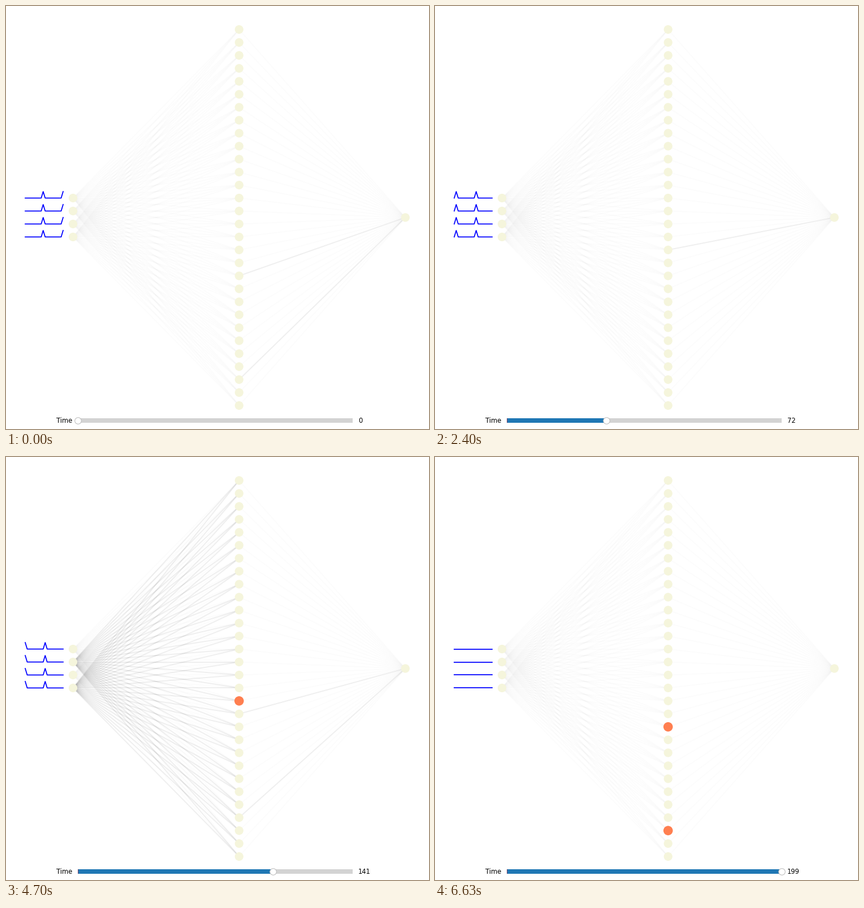
Animation, 748 px wide and 748 px high, one loop 6660 ms. Source, as a matplotlib script:

```python
import numpy as np
import matplotlib.pyplot as plt
from matplotlib.animation import FuncAnimation
from matplotlib.collections import LineCollection
from matplotlib.patches import Circle, Rectangle

SIZE, DPI = 748, 88
PX = 72 / DPI                      # one pixel in points
STEPS, PERIOD, WINDOW = 200, 10, 20
GAP, MID = 22.93, 374
REST, FIRE = "beige", "coral"

fig = plt.figure(figsize=(SIZE / DPI, SIZE / DPI), dpi=DPI, facecolor="white")
ax = fig.add_axes([0, 0, 1, 1])
ax.set(xlim=(0, SIZE), ylim=(SIZE, 0))
ax.axis("off")


def layer(x, n):
    return [(x, MID + GAP * (k - (n - 1) / 2)) for k in range(n)]


inputs, hidden, output = layer(118.5, 4), layer(412.2, 30), layer(706.2, 1)


def fan(starts, ends, alpha, **kw):
    lines = [(a, b) for a in starts for b in ends]
    return ax.add_collection(LineCollection(
        lines, colors="black", alpha=alpha, linewidths=2 * PX, **kw))


# Faint synapses, with a stronger overlay for each sending neuron
fan(inputs, hidden, 0.01, zorder=1)
fan(hidden, output, 0.01, zorder=1)
synapses = {("in", i): fan([p], hidden, 0.05, zorder=2, visible=False)
            for i, p in enumerate(inputs)}
synapses |= {("hid", k): fan([p], output, 0.05, zorder=2, visible=False)
             for k, p in enumerate(hidden)}

neurons = {}
for name, pts in (("in", inputs), ("hid", hidden), ("out", output)):
    for k, p in enumerate(pts):
        neurons[name, k] = ax.add_patch(Circle(p, 7.6, fc=REST, lw=0, zorder=3))

# Incoming spike trains
trace_x = np.linspace(34, 101, WINDOW)
traces = [ax.plot([], [], color="blue", lw=1.75 * PX, zorder=4)[0] for _ in inputs]

# Time slider
LEFT, RIGHT, BAR_Y, BAR_H = 0.17 * SIZE, 0.82 * SIZE, 733.1, 7.48
TOP = BAR_Y - BAR_H / 2
ax.add_patch(Rectangle((LEFT, TOP), RIGHT - LEFT, BAR_H, fc="lightgrey", lw=0, zorder=3))
bar = ax.add_patch(Rectangle((LEFT, TOP), 0, BAR_H, fc="tab:blue", lw=0, zorder=4))
ax.add_patch(Rectangle((LEFT, TOP), 0.6, BAR_H, fc="red", alpha=0.4, lw=0, zorder=5))
knob, = ax.plot([], [], "o", ms=11.5 * PX, mfc="white", mec="0.75",
                mew=1.1 * PX, zorder=6)
pad = 0.02 * (RIGHT - LEFT)
font = dict(family="DejaVu Sans", size=11.5 * PX, va="center")
ax.text(LEFT - pad, BAR_Y, "Time", ha="right", **font)
label = ax.text(RIGHT + pad, BAR_Y, "0", ha="left", **font)


def fired(t):
    """Neurons that spike at step t: one short burst per period."""
    t %= STEPS
    phase = t % PERIOD
    if t < 20:
        return {("in", 1)} if t == 10 else set()
    if phase == 9:
        return {("hid", 19), ("hid", 27)}
    if phase == 0:
        spikes = {("in", 1), ("in", 3)}
        if t >= 30:
            spikes |= {("hid", 18), ("hid", 26), ("out", 0)}
        return spikes
    return {("hid", 17)} if phase == 1 else set()


def update(t):
    now, before = fired(t), fired(t - 1)
    for key, node in neurons.items():
        node.set_facecolor(FIRE if key in now else REST)
        node.set_radius(8.3 if key in now else 7.6)
    for key, lines in synapses.items():
        lines.set_visible(key in before)

    due = t + np.arange(WINDOW)[::-1]
    pulse = (due % PERIOD == 0) & (due < STEPS)
    for line, (_, y) in zip(traces, inputs):
        line.set_data(trace_x, y - GAP / 2 * pulse)

    x = LEFT + (RIGHT - LEFT) * t / (STEPS - 1)
    bar.set_width(x - LEFT)
    knob.set_data([x], [BAR_Y + 0.3])
    label.set_text(str(t))
    return []


anim = FuncAnimation(fig, update, frames=STEPS, interval=33.3,
                     repeat=True, repeat_delay=0, blit=False)
plt.show()
```
